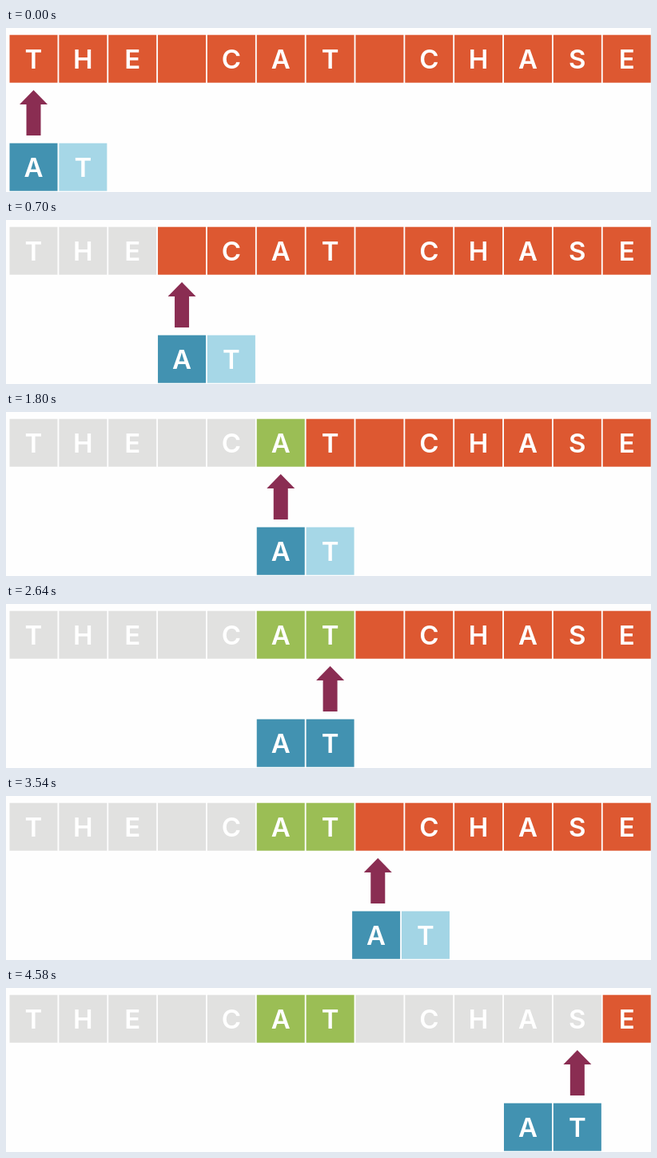
An HTML page with a canvas for the animation above (4650 ms loop, 807 by 206 pixels).

```html
<!DOCTYPE html>
<html lang="en">
<head>
<meta charset="utf-8">
<title>String search</title>
<style>
  html, body { margin: 0; width: 100%; height: 100%; overflow: hidden; background: #fefefe; }
  canvas { display: block; width: 807px; height: 206px; }
</style>
</head>
<body>
<canvas id="stage" width="807" height="206"></canvas>
<script>
const ctx = document.getElementById('stage').getContext('2d');
const LOOP = 4650, TICK = 70;
const LEFT = 4.5, PITCH = 61.85, SIZE = 60;
const TEXT = 'THE CAT CHASE', WORD = 'AT';

const ORANGE = [221, 88, 49], GREY = [225, 225, 224], GREEN = [155, 190, 85];
const DARK = [66, 146, 177], LIGHT = [166, 215, 231], PLUM = [138, 45, 82];

const clamp = v => Math.max(0, Math.min(1, v));
const smooth = p => p * p * (3 - 2 * p);
const rgb = c => `rgb(${c.map(Math.round)})`;
const mix = (a, b, p) => a.map((v, i) => v + (b[i] - v) * p);

// Number of ticks completed in a run of n ticks; 12 ms absorbs a short tick.
const ticks = (t, start, n) =>
  Math.max(0, Math.min(n, Math.floor((t - start + 12) / TICK) + 1));
const ramp = (t, start, n) => ticks(t, start, n) / n;
const ease = (t, start, n) => smooth(ramp(t, start, n));

// Quick hops of one cell each, two ticks per cell.
const hops = (t, start, cells) => {
  const k = ticks(t, start, cells * 2);
  return Math.floor(k / 2) + (k % 2) * 0.69;
};

function pose(t) {
  const jump = 0.95 * ease(t, 2850, 8) + 0.015 * ramp(t, 3410, 3);
  const skip = hops(t, 3950, 3);
  // The long jump settles as the next hops begin.
  const shift = skip > 0 ? 1 : jump;
  const pos = ease(t, 70, 5) + hops(t, 490, 4) + 2 * shift + skip;
  const second = ease(t, 2010, 4) - shift + hops(t, 4440, 1);
  return {
    pos,
    second,
    match: { 5: ramp(t, 1590, 4), 6: ramp(t, 2290, 4), 10: hops(t, 4370, 1) },
    miss: hops(t, 4510, 1)
  };
}

function cell(x, y, color, letter) {
  ctx.fillStyle = rgb(color);
  ctx.fillRect(x, y, SIZE, SIZE);
  ctx.fillStyle = '#fff';
  ctx.fillText(letter, x + SIZE / 2, y + 42);
}

function arrow(x) {
  ctx.fillStyle = rgb(PLUM);
  ctx.beginPath();
  ctx.moveTo(x, 78);
  for (const [dx, y] of [[17.5, 96], [9, 96], [9, 135], [-9, 135], [-9, 96], [-17.5, 96]])
    ctx.lineTo(x + dx, y);
  ctx.fill();
}

function textColor(i, s) {
  const color = mix(ORANGE, GREEN, s.match[i] || 0);
  if (i === 5 || i === 6) return color;
  const gone = i === 10 || i === 11 ? s.miss : clamp(s.pos - i);
  return mix(color, GREY, gone);
}

function draw(t) {
  const s = pose(t);
  ctx.fillStyle = '#fefefe';
  ctx.fillRect(0, 0, 807, 206);
  ctx.font = '600 33px Inter, "Open Sans", sans-serif';
  ctx.textAlign = 'center';
  [...TEXT].forEach((ch, i) => cell(LEFT + i * PITCH, 8.7, textColor(i, s), ch));

  const x = LEFT + s.pos * PITCH;
  cell(x, 144.7, DARK, WORD[0]);
  cell(x + PITCH, 144.7, mix(LIGHT, DARK, clamp(s.second)), WORD[1]);
  arrow(x + SIZE / 2 + s.second * PITCH);
}

const began = performance.now();
function frame() {
  draw((performance.now() - began) % LOOP);
  requestAnimationFrame(frame);
}
frame();
</script>
</body>
</html>
```
